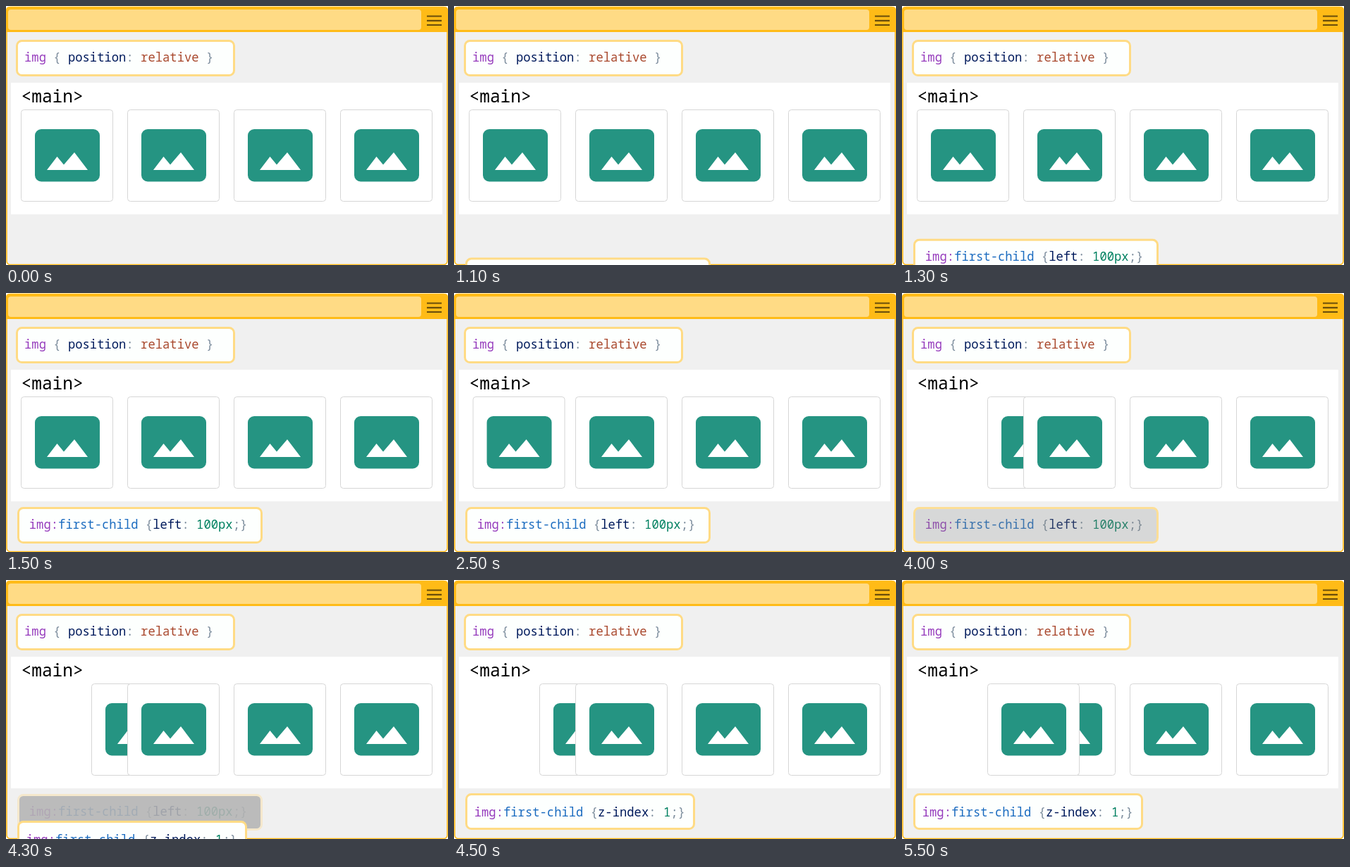
These frames come from a looping animation (627 px wide and 368 px high, 7.5 s). An HTML page:

```html
<!DOCTYPE html>
<html lang="en">
<head>
<meta charset="utf-8">
<title>Relative positioning</title>
<style>
  html, body { margin: 0; width: 100%; height: 100%; overflow: hidden; background: #fff; }
  svg { display: block; width: 627px; height: 368px; }
  text { font-family: "Noto Sans Mono", "DejaVu Sans Mono", monospace; white-space: pre; }
  .code { font-size: 17.2px; }
  .tag { fill: #963cbd; }
  .punc { fill: #7b8c9c; }
  .prop { fill: #001a5c; }
  .value { fill: #a9482d; }
  .pseudo { fill: #1c6cc0; }
  .num { fill: #008060; }
  .fill { fill: #fdfffe; }
  .edge { fill: none; stroke: #ffdb85; stroke-width: 3; }
</style>
</head>
<body>
<svg viewBox="0 0 627 368">
  <rect x="1" y="1.5" width="625" height="366" rx="5" fill="#f0f0f0" stroke="#ffbb17" stroke-width="1.6"/>
  <path d="M0 37V6Q0 1 5 1H622Q627 1 627 6V37Z" fill="#ffbb17"/>
  <rect x="3" y="5" width="586" height="29" rx="4" fill="#ffdb85"/>
  <path d="M597 14.5h21M597 20.8h21M597 27h21" stroke="#694d0b" stroke-width="2.2"/>
  <rect x="7" y="109" width="612" height="187" fill="#fff"/>
  <text x="21.5" y="137" font-size="24.5">&lt;main&gt;</text>
  <g id="cards"></g>
  <g id="rules"></g>
</svg>
<script>
const LOOP = 7500, TICK = 100;
const cards = document.getElementById("cards");
const rules = document.getElementById("rules");

function group(parent, markup) {
  const g = document.createElementNS("http://www.w3.org/2000/svg", "g");
  g.innerHTML = markup;
  parent.append(g);
  return g;
}

function addCard(x) {
  const g = group(cards, `
    <rect x=".5" y=".5" width="130" height="130" rx="4" fill="#fff" stroke="#d6d6d6"/>
    <rect x="20" y="28" width="92" height="74.5" rx="9" fill="#259482"/>
    <path d="M37 86L51.5 67L61 78.5L76 61L95 86Z" fill="#fff"/>`);
  place(g, x, 147);
  return g;
}

// The face (fill and text) is kept apart from the edge so it can darken alone.
function addRule(x, y, w, textX, baseline, parts) {
  const spans = parts.map(([kind, s]) => `<tspan class="${kind}">${s}</tspan>`).join("");
  return group(rules, `
    <g class="face">
      <rect class="fill" x="${x}" y="${y}" width="${w}" height="49" rx="7"/>
      <text class="code" x="${textX}" y="${baseline}">${spans}</text>
    </g>
    <rect class="edge" x="${x}" y="${y}" width="${w}" height="49" rx="7"/>`);
}

function place(el, x, y) {
  el.setAttribute("transform", `translate(${x} ${y})`);
}

const [first, second] = [0, 1, 2, 3].map(i => addCard(21 + 151 * i));

addRule(15.5, 49.5, 308, 26, 79, [
  ["tag", "img"], ["punc", " { "], ["prop", "position"], ["punc", ": "],
  ["value", "relative"], ["punc", " }"]]);
const leftRule = addRule(17.5, 305.5, 345, 32.8, 335, [
  ["tag", "img:"], ["pseudo", "first-child"], ["punc", " {"], ["prop", "left"],
  ["punc", ": "], ["num", "100px"], ["punc", ";}"]]);
const zRule = addRule(17.5, 304.5, 323, 28.7, 336, [
  ["tag", "img:"], ["pseudo", "first-child"], ["punc", " {"], ["prop", "z-index"],
  ["punc", ": "], ["num", "1"], ["punc", ";}"]]);
const leftFace = leftRule.querySelector(".face");

// Share of a stepped move that is done; the first step lands at `start`.
function progress(t, start, steps) {
  const done = Math.floor((t - start) / TICK) + 1;
  return Math.min(Math.max(done, 0), steps) / steps;
}

const easeInOut = p => p < 0.5 ? 2 * p * p : 1 - 2 * (1 - p) ** 2;

function flyIn(el, p, distance) {
  el.style.display = p > 0 ? "" : "none";
  place(el, 0, distance * (1 - p));
}

let firstOnTop = null;
function raise(onTop) {
  if (onTop === firstOnTop) return;
  firstOnTop = onTop;
  if (onTop) cards.append(first);
  else cards.insertBefore(first, second);
}

function draw(t) {
  flyIn(leftRule, progress(t, 1100, 5), 67);
  place(first, 21 + 100 * easeInOut(progress(t, 2500, 6)), 147);

  const keep = 1 - progress(t, 4000, 6);
  leftRule.style.opacity = keep;
  leftFace.style.filter = keep < 1 ? `brightness(${keep})` : "none";

  flyIn(zRule, progress(t, 4200, 4), 78);
  raise(t >= 5500);
}

const begin = performance.now();
function frame() {
  draw((performance.now() - begin) % LOOP);
  requestAnimationFrame(frame);
}
frame();
</script>
</body>
</html>
```
